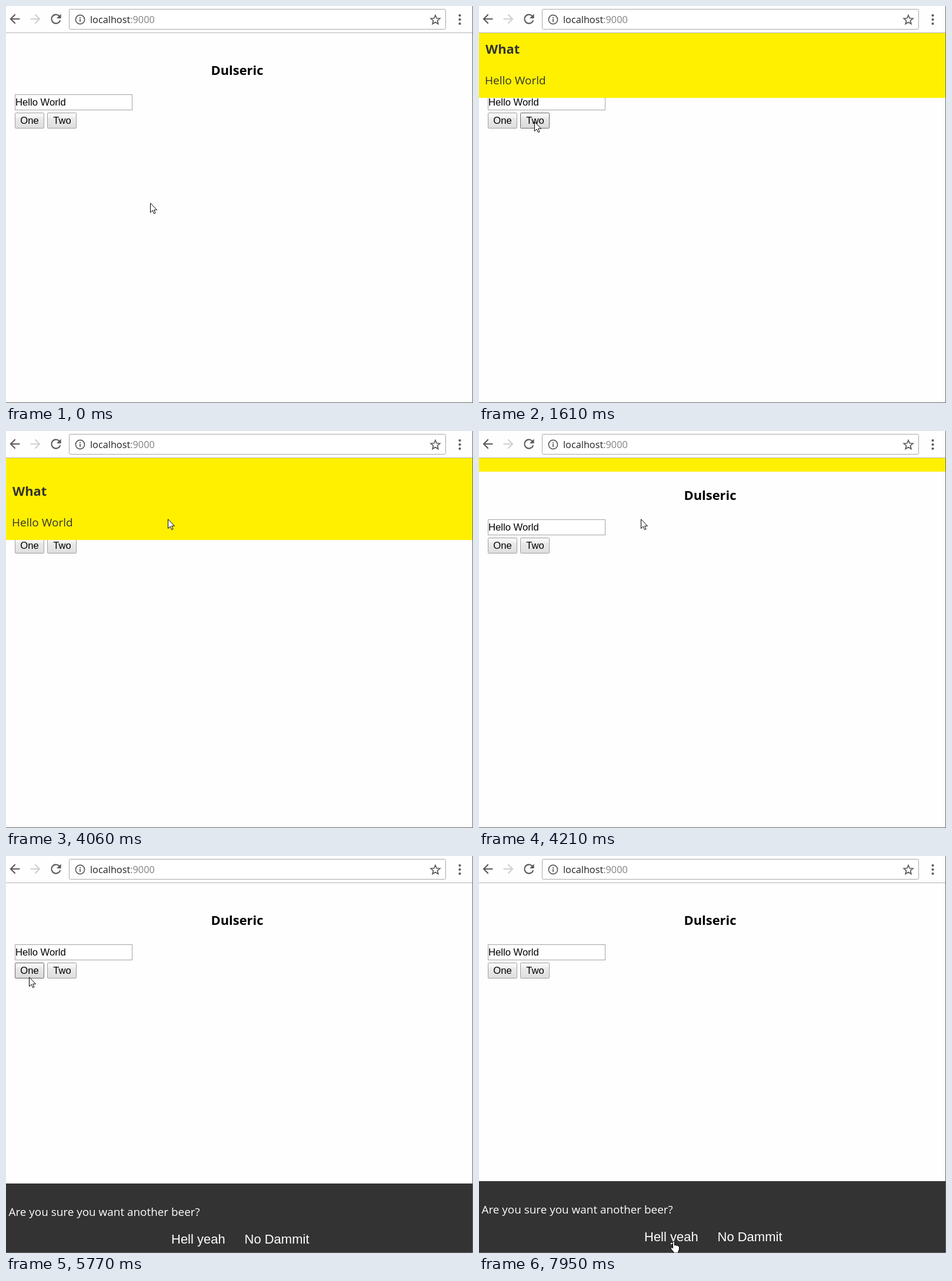
These frames come from a looping animation (794x674 px, 7.99 s). An HTML page:

```html
<!DOCTYPE html>
<html lang="en">
<head>
<meta charset="utf-8">
<title>Notification demo</title>
<style>
  html, body { margin: 0; width: 100%; height: 100%; overflow: hidden; background: #fefefe; }
  svg { display: block; }
  text { font-family: "Open Sans", "Noto Sans", sans-serif; white-space: pre; }
  .ui { font-family: "Liberation Sans", Arial, sans-serif; font-size: 16.67px; }
  .bold { font-size: 21.9px; font-weight: 700; }
  .choice { font-family: "Liberation Sans", Arial, sans-serif; font-size: 22px; }
  .button rect { fill: url(#face); stroke: #a0a0a0; }
  .button.hover rect { fill: url(#lit); stroke: #6a6a6a; }
  .button.down rect { fill: url(#pressed); stroke: #6a6a6a; }
</style>
</head>
<body>
<svg width="794" height="674" viewBox="0 0 794 674">
  <defs>
    <linearGradient id="face" x2="0" y2="1">
      <stop stop-color="#f8f8f8"/><stop offset=".3" stop-color="#f3f3f3"/>
      <stop offset=".3" stop-color="#ebebeb"/><stop offset="1" stop-color="#dedede"/>
    </linearGradient>
    <linearGradient id="lit" x2="0" y2="1">
      <stop stop-color="#f8f8f8"/><stop offset=".3" stop-color="#f1f1f1"/>
      <stop offset=".3" stop-color="#e9e9e9"/><stop offset="1" stop-color="#d9d9d9"/>
    </linearGradient>
    <linearGradient id="pressed" x2="0" y2="1">
      <stop stop-color="#e4e4e4"/><stop offset="1" stop-color="#f0f0f0"/>
    </linearGradient>
    <path id="arrow" d="M20 11H7.83l5.59-5.59L12 4l-8 8 8 8 1.41-1.41L7.83 13H20z"/>
  </defs>
  <rect width="794" height="674" fill="#fefefe"/>

  <!-- toolbar -->
  <g fill="#5a5a5a">
    <use href="#arrow" transform="translate(2.2 9.3) scale(1.06)"/>
    <use href="#arrow" transform="translate(62.8 9.3) scale(-1.06 1.06)" fill="#d0d0d0"/>
    <path transform="translate(72 9.1) scale(1.08)" d="M17.65 6.35A8 8 0 1 0 19.73 14H17.65A6 6 0 1 1 16.22 7.78L13 11H20V4z"/>
    <circle cx="771.5" cy="16" r="2.1"/><circle cx="771.5" cy="23" r="2.1"/><circle cx="771.5" cy="30" r="2.1"/>
  </g>
  <rect x="107.5" y="5.5" width="640" height="34" rx="2" fill="#fff" stroke="#a8a8a8"/>
  <circle cx="126" cy="23" r="7.6" fill="none" stroke="#5a5a5a" stroke-width="1.7"/>
  <path d="M126 19v2M126 22v5" stroke="#5a5a5a" stroke-width="1.8"/>
  <path id="star" fill="none" stroke="#5a5a5a" stroke-width="1.7"/>
  <text x="143" y="29" font-size="16.3" fill="#222">localhost<tspan fill="#808080">:9000</tspan></text>
  <path d="M0 45.5H793" stroke="#b4b4b4"/>

  <!-- page -->
  <text class="bold" x="393" y="117" text-anchor="middle">Dulseric</text>
  <rect x="15.5" y="150.5" width="199" height="26" fill="#fff" stroke="#a4a4a4"/>
  <text class="ui" x="16" y="169">Hello World</text>
  <g class="button" id="one">
    <rect x="15.5" y="181.5" width="49" height="26" rx="1"/>
    <text class="ui" x="40" y="200" text-anchor="middle">One</text>
  </g>
  <g class="button" id="two">
    <rect x="70.5" y="181.5" width="49" height="26" rx="1"/>
    <text class="ui" x="95.5" y="200" text-anchor="middle">Two</text>
  </g>

  <!-- sliding panels, clipped to the page -->
  <svg y="46" width="793" height="627" overflow="hidden">
    <g id="notice" fill="#333">
      <rect width="793" height="142" fill="#fff000"/>
      <text class="bold" x="11" y="67">What</text>
      <text x="10" y="119" font-size="19">Hello World</text>
    </g>
    <g id="dialog" fill="#fff">
      <rect width="793" height="122" fill="#333"/>
      <text x="4.5" y="55" font-size="18.9">Are you sure you want another beer?</text>
      <text class="choice" x="281" y="102">Hell yeah</text>
      <text class="choice" x="405.5" y="102">No Dammit</text>
    </g>
  </svg>
  <path d="M793.5 0V673.5H0" fill="none" stroke="#666"/>

  <g id="cursor" fill="#fff" stroke="#000">
    <path id="pointer" d="M.5 .8V16.5L4.2 13L6.6 18.5L9 17.5L6.7 12.2H11.5Z"/>
    <path id="hand" d="M-1.5 12V2Q-1.5 .5 0 .5T1.5 2V7Q3.3 5.5 4.5 7.3Q6.5 6.3 7.5 8.2Q9.5 7.6 9.5 10V14L7.8 17.5V20H-.5V18L-4.5 13Q-5.5 11 -3.8 10.5Q-2.8 10.5 -1.5 12Z"/>
  </g>
</svg>
<script>
const LOOP = 7990;
const get = id => document.getElementById(id);
const [one, two, notice, dialog, cursor, pointer, hand] =
  ["one", "two", "notice", "dialog", "cursor", "pointer", "hand"].map(get);

// time, x, y of the pointer's tip
const path = [
  [340, 245, 334], [480, 212, 302], [720, 118, 218], [890, 94, 196],
  [2490, 94, 196], [2700, 117, 204], [2920, 159, 196], [3220, 267, 154],
  [3290, 261, 159], [3350, 268, 153], [3420, 275, 149],
  [4270, 275, 149], [4420, 220, 168], [4710, 72, 209], [4810, 62, 207], [5110, 39, 205],
  [6040, 39, 205], [6200, 55, 250], [6600, 128, 440], [6840, 155, 509], [6920, 151, 522],
  [7390, 151, 522], [7550, 195, 550], [7800, 305, 630], [7950, 331, 654]
];

const clamp = v => Math.min(1, Math.max(0, v));

function pointAt(t) {
  const i = path.findIndex(p => p[0] > t);
  if (i < 1) return path.at(i).slice(1);
  const [t0, x0, y0] = path[i - 1], [t1, x1, y1] = path[i];
  const k = (t - t0) / (t1 - t0);
  return [Math.round(x0 + (x1 - x0) * k), Math.round(y0 + (y1 - y0) * k)];
}

// the CSS "ease" curve, cubic-bezier(.25, .1, .25, 1)
function ease(x) {
  const curve = (a, b, s) => 3 * a * s * (1 - s) ** 2 + 3 * b * s * s * (1 - s) + s ** 3;
  let lo = 0, hi = 1;
  for (let i = 0; i < 20; i++) {
    const mid = (lo + hi) / 2;
    if (curve(.25, .25, mid) < x) lo = mid; else hi = mid;
  }
  return curve(.1, 1, hi);
}

const slide = (t, start, length) => t <= start ? 0 : t >= start + length ? 1 : ease(clamp((t - start) / length));
const move = (el, x, y) => el.setAttribute("transform", `translate(${x} ${y})`);

function setButton(el, left, x, y, down) {
  const over = x >= left && x < left + 50 && y >= 181 && y < 208;
  el.setAttribute("class", "button" + (down ? " down" : over ? " hover" : ""));
}

function draw(now) {
  const t = now % LOOP;
  const [x, y] = pointAt(t);
  setButton(one, 15, x, y, t >= 5290 && t < 5390);
  setButton(two, 70, x, y, t >= 1220 && t < 1390);

  const shown = slide(t, 1450, 340) - slide(t, 4050, 300);
  move(notice, 0, Math.round(142 * (shown - 1)));
  move(dialog, 0, Math.round(628 - 122 * slide(t, 5540, 300)));

  const onChoice = y > 628 && x > 270;
  pointer.style.display = onChoice ? "none" : "";
  hand.style.display = onChoice ? "" : "none";
  move(cursor, x, y);
  requestAnimationFrame(() => draw(performance.now()));
}

const corners = Array.from({ length: 10 }, (_, i) => {
  const a = i * Math.PI / 5, r = i % 2 ? 3.7 : 8.2;
  return [730 + r * Math.sin(a), 23.8 - r * Math.cos(a)].map(v => v.toFixed(2));
});
get("star").setAttribute("d", "M" + corners.join("L") + "Z");
draw(performance.now());
</script>
</body>
</html>
```
